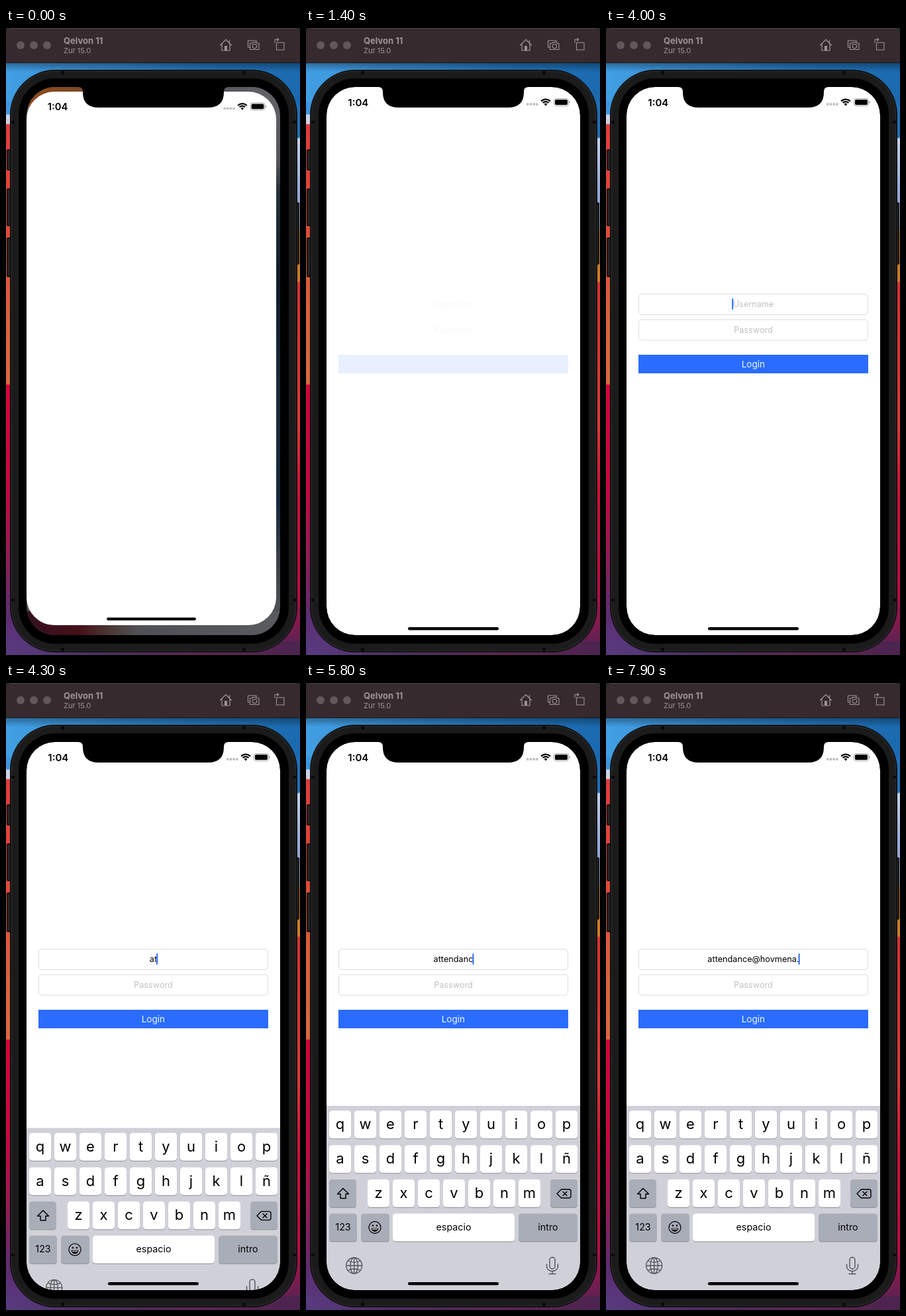
Recreate the animation shown at these times as an HTML page with a canvas. Size 444x946 px, loop 8 s.

```html
<!DOCTYPE html>
<html lang="en">
<head>
<meta charset="utf-8">
<title>Login on a phone simulator</title>
<style>
  html, body { margin: 0; width: 100%; height: 100%; overflow: hidden; background: #000; }
  canvas { display: block; width: 444px; height: 946px; }
</style>
</head>
<body>
<canvas id="stage"></canvas>
<script>
const W = 444, H = 946, LOOP = 8000, STEP = 100;
const canvas = document.getElementById('stage');
const dpr = window.devicePixelRatio || 1;
canvas.width = W * dpr;
canvas.height = H * dpr;
const c = canvas.getContext('2d');

const SCREEN = { x: 31, y: 89, w: 383, h: 827, r: 43 };
const ACCENT = '#2a6cff';
const ENTRY = 'attendance@hovmena.';
const KEY_TIMES = [4200, 4300, 4500, 4800, 5000, 5200, 5400, 5600, 5800, 6000,
                   6200, 6400, 6600, 6800, 7000, 7200, 7400, 7700, 7900];

function box(x, y, w, h, r, fill) {
  c.beginPath();
  c.roundRect(x, y, w, h, r);
  if (fill) { c.fillStyle = fill; c.fill(); }
}

function disc(x, y, r, fill) {
  c.beginPath();
  c.arc(x, y, r, 0, Math.PI * 2);
  c.fillStyle = fill;
  c.fill();
}

function line(d, color, width = 1.2) {
  c.strokeStyle = color;
  c.lineWidth = width;
  c.lineJoin = c.lineCap = 'round';
  c.stroke(new Path2D(d));
}

function text(s, x, y, size, color, weight = 400, align = 'center') {
  c.font = `${weight} ${size}px Inter, "Open Sans", sans-serif`;
  c.textAlign = align;
  c.fillStyle = color;
  c.fillText(s, x, y);
  return c.measureText(s).width;
}

// Stops are [position, colour] pairs given in pixels along the axis.
function ramp(vertical, from, to, stops) {
  const g = vertical ? c.createLinearGradient(0, from, 0, to) : c.createLinearGradient(from, 0, to, 0);
  for (const [p, color] of stops) g.addColorStop((p - from) / (to - from), color);
  return g;
}

function wallpaper() {
  c.fillStyle = ramp(true, 0, H, [
    [0, '#2b83c9'], [60, '#3b97dc'], [130, '#3f95dc'], [131, '#c3d5ee'], [144, '#d3cfe0'],
    [146, '#dd3c3c'], [300, '#dc4a38'], [420, '#d9603a'], [537, '#d6693c'], [539, '#cf0538'],
    [700, '#c00942'], [800, '#8f1d58'], [880, '#5f2c70'], [946, '#553a80']]);
  c.fillRect(0, 0, W / 2, H);
  c.fillStyle = ramp(true, 0, H, [
    [0, '#1f6cb2'], [165, '#1f70b8'], [167, '#c4cfea'], [235, '#9aaedb'], [300, '#8094c4'],
    [310, '#c97a26'], [382, '#cf7c22'], [384, '#d8322f'], [600, '#dc3a35'], [700, '#cf1038'],
    [850, '#b80c45'], [900, '#7c1c50'], [946, '#4c2450']]);
  c.fillRect(W / 2, 0, W / 2, H);
  c.fillStyle = ramp(false, 0, W, [[0, '#429fe4'], [150, '#3488cc'], [300, '#2374ba'], [444, '#1b69ae']]);
  c.fillRect(0, 52, W, 60);
  c.fillStyle = ramp(true, 52, 66, [[52, 'rgba(0,0,0,.35)'], [66, 'rgba(0,0,0,0)']]);
  c.fillRect(0, 52, W, 14);
  c.fillStyle = ramp(false, 0, W, [[0, '#5a397f'], [150, '#4a2f62'], [300, '#5e2450'], [444, '#4c2450']]);
  c.fillRect(0, 925, W, 21);
}

function toolbar() {
  const ink = '#9d9397';
  c.fillStyle = '#183238';
  c.fillRect(0, 0, W, 10);
  box(0, 0, W, 53, [8, 8, 0, 0], '#1f171b');
  box(0, 0, W, 52, [8, 8, 0, 0], '#372a2f');
  c.fillStyle = '#50454a';
  c.fillRect(7, 0, W - 14, 1);
  for (const x of [22, 42, 62]) disc(x, 26, 6, '#62585c');
  text('Qelvon 11', 87, 24, 13, ink, 700, 'left');
  text('Zur 15.0', 87, 38, 11, ink, 400, 'left');
  line('M323.5 26L332 17.5L340.5 26M326 24.5V34H338V24.5M337.5 18.5V22', ink);
  box(330, 27, 4, 7, 0, ink);
  line('M368 29H365.5V19H378V21.5M368.5 23H371.5L373 21.5H378L379.5 23H382V32.5H368.5Z', ink, 1.1);
  line('M372.2 27.5a3.2 3.2 0 1 0 6.4 0a3.2 3.2 0 1 0 -6.4 0', ink, 1.1);
  line('M408.5 22H420V33H408.5ZM406 22V17.5H411.5M409.5 15.5L411.8 17.5L409.5 19.5', ink, 1.1);
}

function phone() {
  for (const [y, h] of [[183, 32], [242, 57], [316, 60]]) {
    box(1, y, 8, h, 2, '#111');
    box(2.5, y + 2, 4, h - 4, 1, '#252525');
  }
  box(436, 263, 7, 94, 2, '#111');
  box(438, 265, 3.5, 90, 1, '#252525');
  box(6, 63, 434, 879, 68, '#0c0c0c');
  box(7.5, 64.5, 431, 876, 66, '#252525');
  box(9.5, 66.5, 427, 872, 64, '#1b1b1b');
  c.fillStyle = '#0a0a0a';
  for (const x of [83, 357]) for (const y of [65, 935]) c.fillRect(x, y, 5, 5);
  for (const x of [8, 433]) for (const y of [140, 861]) c.fillRect(x, y, 5, 4);
  box(19, 76, 408, 853, 55, '#000');
}

function notch() {
  c.fillStyle = '#000';
  c.fill(new Path2D('M109 88V89Q116 89 116 96V97Q116 120 140 120H305Q329 120 329 97V96Q329 89 336 89V88Z'));
}

function statusBar() {
  text('1:04', 63.3, 117.5, 15, '#000', 600, 'left');
  for (let i = 0; i < 4; i++) disc(334.8 + i * 4.7, 115, 1.9, '#bdbdbf');
  c.strokeStyle = '#000';
  c.lineCap = 'butt';
  c.lineWidth = 2.3;
  for (const r of [9.4, 5.9]) {
    c.beginPath();
    c.arc(362, 117, r, -Math.PI * .76, -Math.PI * .24);
    c.stroke();
  }
  c.beginPath();
  c.moveTo(362, 117.5);
  c.arc(362, 117, 3.2, -Math.PI * .76, -Math.PI * .24);
  c.fillStyle = '#000';
  c.fill();
  box(374.5, 106.5, 22, 11, 3);
  c.strokeStyle = '#a0a0a2';
  c.lineWidth = 1;
  c.stroke();
  box(376, 108, 19, 8, 1.8, '#000');
  box(397.3, 110.2, 1.4, 3.6, 1, '#a0a0a2');
}

function form(t) {
  if (t < 1400) return;
  const p = Math.min(1, (t - 1300) / 500);
  c.save();
  c.globalAlpha = p * p * (3 - 2 * p);
  for (const y of [401.5, 440]) {
    box(49.5, y, 346, 31, 4.5, '#fff');
    c.strokeStyle = '#dcdcde';
    c.lineWidth = 1;
    c.stroke();
  }
  const typed = ENTRY.slice(0, KEY_TIMES.filter(k => t >= k).length);
  const label = typed || 'Username';
  const width = text(label, 222.5, 421.3, 12.7, typed ? '#000' : '#c1c1c4');
  text('Password', 222.5, 460, 12.7, '#c1c1c4');
  c.fillStyle = ACCENT;
  c.fillRect(49, 493, 347, 28);
  text('Login', 222.3, 512, 13.5, '#effbff');
  if (t >= 4000) {
    const side = typed ? width / 2 : -width / 2 - .5;
    box(222 + side - .5, 408, 2, 17, 1, ACCENT);
  }
  c.restore();
}

function key(x, y, w, dark) {
  box(x, y + 1, w, 42, 4.5, '#8c8e94');
  box(x, y, w, 42, 4.5, dark ? '#a9adb8' : '#fff');
}

function keyRow(letters, x, y) {
  [...letters].forEach((ch, i) => {
    key(x + i * 38, y, 33, false);
    text(ch, x + i * 38 + 16.5, y + 28, 22, '#000');
  });
}

function keyboard(t) {
  const s = (t - 4100) / 1000;
  if (s <= 0) return;
  // Critically damped spring
  const k = 18.3 * s, dy = 278 * (1 + k) * Math.exp(-k);
  const ink = '#505359';
  c.save();
  c.translate(0, dy);
  c.fillStyle = '#d0d1d8';
  c.fillRect(31, 638, 383, 290);
  keyRow('qwertyuiop', 35, 645.3);
  keyRow('asdfghjklñ', 35, 697.3);
  keyRow('zxcvbnm', 93, 749);
  key(35, 749, 41, true);
  key(369, 749, 41, true);
  key(35, 800.5, 42, true);
  key(83, 800.5, 43, true);
  key(131, 800.5, 184, false);
  key(321, 800.5, 89, true);
  line('M56 762.5L64.5 771H60V777.5H52V771H47.5Z', '#000', 1.5);
  line('M385.5 764H397Q400 764 400 767V774Q400 777 397 777H385.5L379 770.5ZM388 767.5L394 773.5M394 767.5L388 773.5', '#000', 1.4);
  text('123', 56, 826, 14.3, '#000');
  text('espacio', 223, 825.5, 14.3, '#000');
  text('intro', 365.5, 825.5, 14.3, '#000');
  line('M95 821.5a9 9 0 1 0 18 0a9 9 0 1 0 -18 0', '#111', 1.4);
  disc(101, 818.7, 1.4, '#111');
  disc(107, 818.7, 1.4, '#111');
  c.beginPath();
  c.arc(104, 822.5, 5.4, 0, Math.PI);
  c.closePath();
  c.fillStyle = '#111';
  c.fill();
  c.fillStyle = '#c9ccd3';
  c.fillRect(100, 823.3, 8, 1.3);
  line('M60.7 879a12 12 0 1 0 24 0a12 12 0 1 0 -24 0M67 879a5.7 12 0 1 0 11.4 0a5.7 12 0 1 0 -11.4 0' +
       'M72.7 867V891M60.7 879H84.7M63.5 872Q72.7 876 82 872M63.5 886Q72.7 882 82 886', ink, 1.3);
  line('M368 870.5a4 4 0 0 1 8 0V880a4 4 0 0 1 -8 0ZM363.5 877V880a8.5 7.5 0 0 0 17 0V877M372 887.5V891.5M367 891.5H377', ink, 1.4);
  c.restore();
}

// Dimmed home screen seen around the app while it opens
function homeScreen() {
  c.fillStyle = ramp(true, 89, 916, [
    [89, '#636367'], [200, '#55565a'], [245, '#26313c'], [380, '#101c28'], [550, '#1b2a38'],
    [720, '#14293f'], [800, '#3a3f47'], [916, '#57585c']]);
  c.fillRect(31, 89, 383, 827);
  c.fillStyle = ramp(false, 31, 414, [[31, '#8c4a1b'], [115, '#7a4a28'], [330, '#58585c'], [414, '#646468']]);
  c.fillRect(31, 89, 360, 30);
  c.fillStyle = ramp(false, 31, 414, [[31, '#35101f'], [110, '#451019'], [150, '#4a3330'], [200, '#505156'], [414, '#5a5b5f']]);
  c.fillRect(31, 880, 383, 36);
}

function app(t) {
  const { x, y, w, h, r } = SCREEN;
  const k = Math.max(0, 1 - t / 300) ** 2;
  const sx = 1 - .0155 * k, sy = 1 - .0265 * k;
  c.save();
  box(x, y, w, h, r);
  c.clip();
  if (k > 0) homeScreen();
  c.translate(x, y + 7 * k);
  c.scale(sx, sy);
  c.translate(-x, -y);
  box(x, y, w, h, r, '#fff');
  c.clip();
  statusBar();
  form(t);
  keyboard(t);
  box(154, 904, 137, 4.4, 2.2, '#000');
  c.restore();
  notch();
}

function frame(now) {
  const t = Math.floor((now - start) % LOOP / STEP) * STEP;
  c.setTransform(dpr, 0, 0, dpr, 0, 0);
  wallpaper();
  toolbar();
  phone();
  app(Math.max(0, t));
  requestAnimationFrame(frame);
}

const start = performance.now();
requestAnimationFrame(frame);
</script>
</body>
</html>
```
